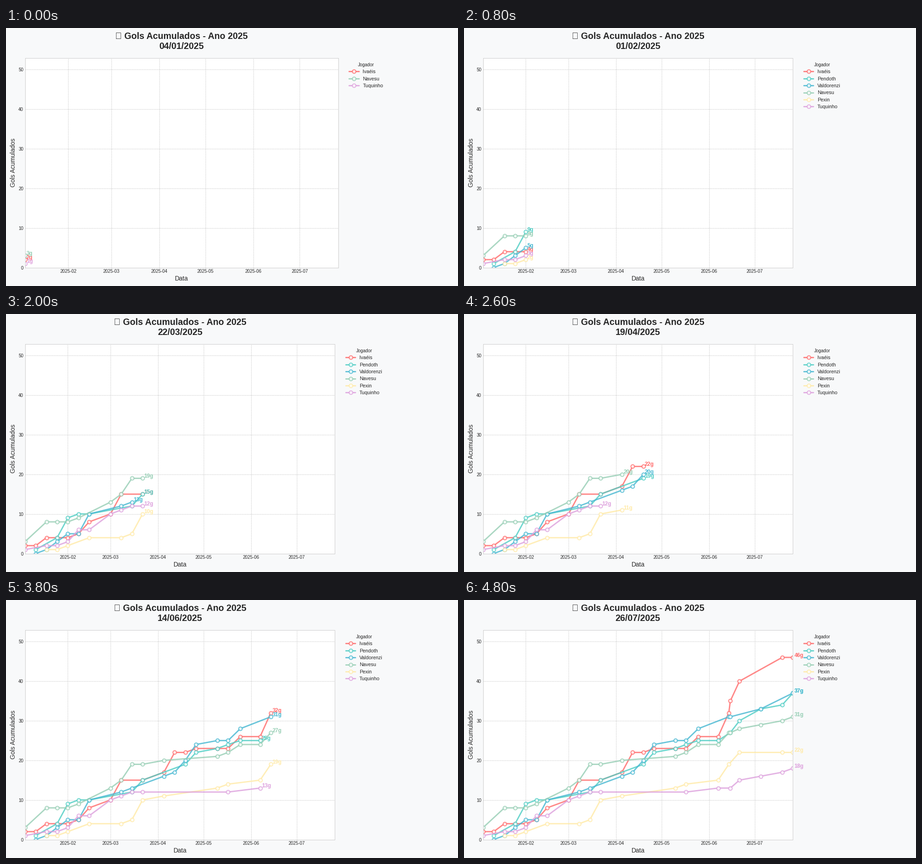
A matplotlib script that plays this animation: 990x566 px, repeating every 5 s.

```python
import matplotlib.dates as mdates
import matplotlib.pyplot as plt
import numpy as np
from matplotlib.animation import FuncAnimation

WIDTH, HEIGHT, DPI = 990, 566, 72
PT = WIDTH / 14 / 72  # one point of the 14-inch layout, in pixels
LEFT, TOP, BOTTOM = 41.7, 66, 525.5
INK, RULE = "0.15", "0.8"

plt.rcParams.update({
    "font.family": "Liberation Sans",
    "font.size": 10 * PT,
    "text.color": INK,
    "axes.labelcolor": INK,
    "axes.edgecolor": RULE,
    "axes.linewidth": PT,
    "axes.axisbelow": True,
    "axes.labelpad": 4 * PT,
    "xtick.color": INK,
    "ytick.color": INK,
    "xtick.major.size": 0,
    "ytick.major.size": 0,
    "xtick.major.pad": 3.5 * PT,
    "ytick.major.pad": 3.5 * PT,
    "lines.solid_capstyle": "round",
})

START = mdates.datestr2num("2025-01-04")
DAYS = START + np.array([0, 7, 14, 21, 28, 35, 42, 56, 63, 70, 77, 91, 98,
                         105, 112, 126, 133, 141, 154, 161, 162, 168, 182,
                         196, 203])

_ = np.nan  # match day without the player
PLAYERS = [
    ("Ivaéis", "#FF6B6B",
     [2, 2, 4, 4, 4, 5, 8, 10, 15, _, 15, 17, 22,
      22, 23, 23, 23, 26, 26, 32, 35, 40, _, 46, 46]),
    ("Pendoth", "#4ECDC4",
     [_, 1, _, 4, 9, 10, 10, _, _, 12, 15, _, _,
      19, 22, 23, 24, 25, 25, _, 27, 30, 33, 34, 37]),
    ("Valdorenzi", "#45B7D1",
     [_, 0, 1, 3, 5, 5, 10, _, 12, 13, _, 16, 17,
      20, 24, 25, 25, 28, _, 31, 31, _, 33, _, 37]),
    ("Navesu", "#96CEB4",
     [3, _, 8, 8, 8, 9, _, 13, 15, 19, 19, 20, _,
      _, _, 21, 22, 24, 24, 27, 27, 28, 29, 30, 31]),
    ("Pexin", "#FFEAA7",
     [_, _, 1, 1, 2, _, 4, _, 4, 5, 10, 11, _,
      _, _, 13, 14, _, 15, 19, _, 22, _, 22, 22]),
    ("Tuquinho", "#DDA0DD",
     [1, _, 2, 2, 3, 6, 6, 10, 11, 12, 12, _, _,
      _, _, _, 12, _, 13, _, 13, 15, 16, 17, 18]),
]
PEAK = max(np.nanmax(goals) for *_rest, goals in PLAYERS)

fig = plt.figure(figsize=(WIDTH / DPI, HEIGHT / DPI), dpi=DPI,
                 facecolor="#F8F9FA")
ax = fig.add_axes([0, 0, 1, 1])


def place_axes(right):
    ax.set_position([LEFT / WIDTH, 1 - BOTTOM / HEIGHT,
                     (right - LEFT) / WIDTH, (BOTTOM - TOP) / HEIGHT])


def draw_player(name, color, goals, step):
    goals = np.array(goals[:step + 1], float)
    played = ~np.isnan(goals)
    if not played.any():
        return
    days, goals = DAYS[:step + 1][played], goals[played]
    ax.plot(days, goals, color=color, alpha=0.8, lw=3 * PT, marker="o",
            ms=8 * PT, mfc="white", mec=color, mew=2 * PT, label=name)
    ax.text(days[-1] + 1, goals[-1] + 0.5, f"{goals[-1]:.0f}g", color=color,
            size=12 * PT, weight="bold", ha="left", va="center")


def update(step):
    ax.clear()
    # The longest name joins the legend on the second match day.
    place_axes(727.7 if step == 0 else 720.4)
    for player in PLAYERS:
        draw_player(*player, step)

    ax.set_xlim(DAYS[0], DAYS[-1])
    ax.set_ylim(0, PEAK * 1.15)
    ax.xaxis.set_major_locator(mdates.MonthLocator())
    ax.xaxis.set_major_formatter(mdates.DateFormatter("%Y-%m"))
    ax.grid(True, color="0.75", ls="--", lw=0.7 * PT)
    ax.set_xlabel("Data", size=14 * PT)
    ax.set_ylabel("Gols Acumulados", size=14 * PT)

    today = mdates.num2date(DAYS[step]).strftime("%d/%m/%Y")
    ax.set_title(f"\U0001F4CA Gols Acumulados - Ano 2025\n{today}",
                 size=20 * PT, weight="bold", pad=20 * PT)
    ax.legend(title="Jogador", title_fontsize=10 * PT, fontsize=11 * PT,
              loc="upper left", bbox_to_anchor=(1.02, 1), frameon=False)
    return ax.get_children()


anim = FuncAnimation(fig, update, frames=len(DAYS), interval=200,
                     init_func=lambda: update(0), repeat=True, repeat_delay=0)
plt.show()
```
